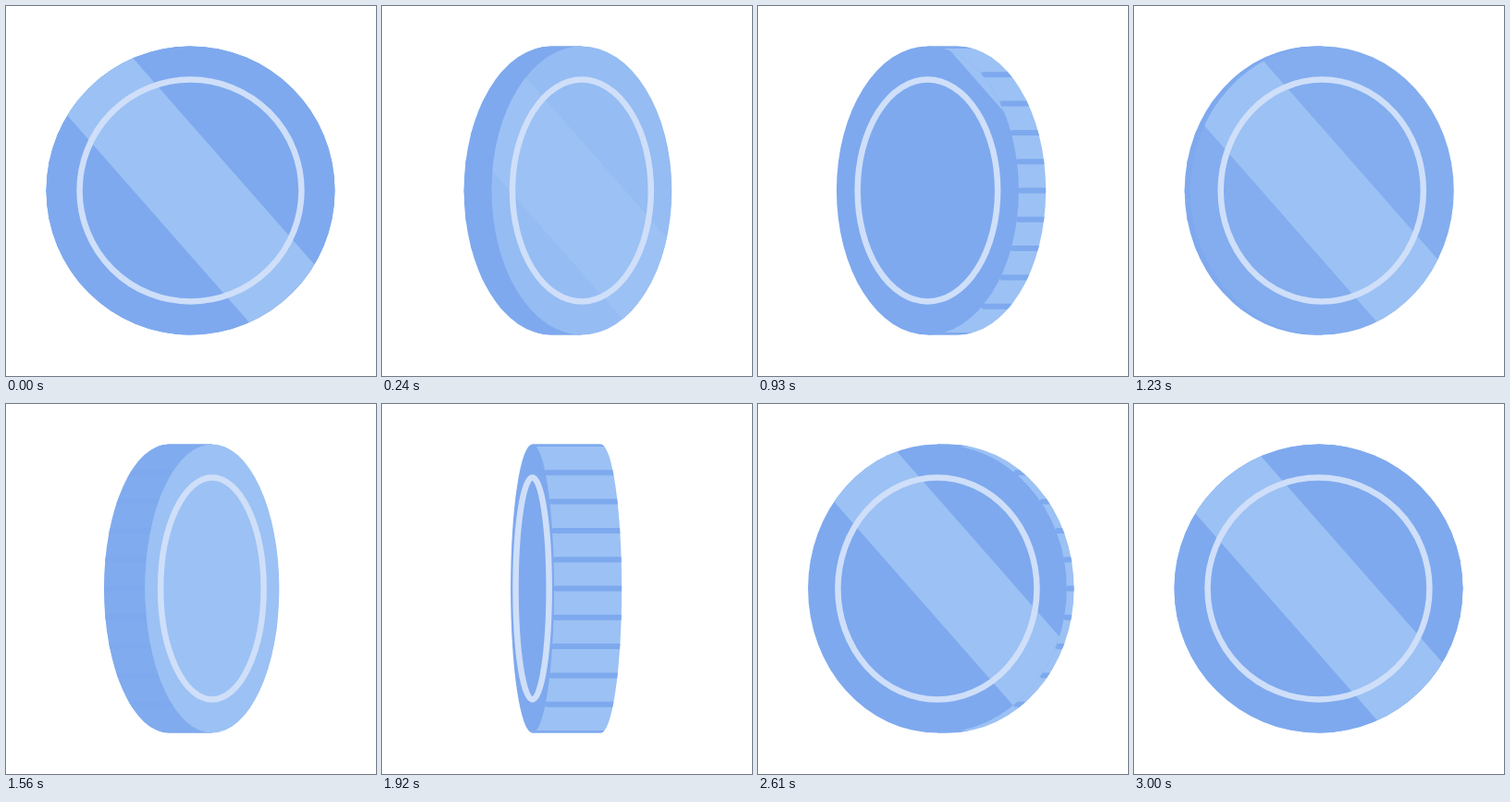
Recreate the animation shown at these times as an HTML page with a canvas. Size 400 px wide and 400 px high, loop 3030 ms.

```html
<!DOCTYPE html>
<html>
<head>
<meta charset="utf-8">
<title>Spinning coin</title>
<style>
html, body { margin: 0; width: 100%; height: 100%; overflow: hidden; background: #fff; }
canvas { display: block; }
</style>
</head>
<body>
<canvas id="stage" width="400" height="400"></canvas>
<script>
const ctx = document.getElementById('stage').getContext('2d');
const MID = 199.5, R = 156, SLOPE = 1.138, LOOP = 3030, STEP = 30;
const DARK = [126, 169, 238], LIGHT = [156, 193, 244], RING = '#cfdff9';

// Signed half width of the face: positive faces right, negative faces left.
const TURNS = [
  [[0, 156], [480, 36], [930, -98.5], [1080, -137], [1165, -156]],
  [[1165, 156], [1560, 72.5], [1920, -23.5], [2160, -80], [2280, -102], [2700, -147.5], [3000, -156]]
];

const clamp = (v, a, b) => Math.min(b, Math.max(a, v));
const mix = m => `rgb(${DARK.map((v, i) => Math.round(v + (LIGHT[i] - v) * m))})`;

// Smooth curve through the points.
function curve(pts, t) {
  const last = pts.length - 1;
  if (t >= pts[last][0]) return pts[last][1];
  const slope = i => {
    const a = pts[Math.max(0, i - 1)], b = pts[Math.min(last, i + 1)];
    return (b[1] - a[1]) / (b[0] - a[0]);
  };
  const i = pts.findIndex(p => p[0] > t) - 1;
  const [t0, v0] = pts[i], [t1, v1] = pts[i + 1];
  const h = t1 - t0, u = (t - t0) / h, u2 = u * u, u3 = u2 * u;
  return (2 * u3 - 3 * u2 + 1) * v0 + (u3 - 2 * u2 + u) * h * slope(i) +
         (3 * u2 - 2 * u3) * v1 + (u3 - u2) * h * slope(i + 1);
}

function disc(x, rx, ry) {
  const p = new Path2D();
  p.ellipse(x, MID, rx, ry, 0, 0, Math.PI * 2);
  return p;
}

// Diagonal band given by its two crossings of the middle line.
function sheen(low, high) {
  const dx = 200 / SLOPE;
  ctx.beginPath();
  ctx.moveTo(low - dx, MID - 200);
  ctx.lineTo(high - dx, MID - 200);
  ctx.lineTo(high + dx, MID + 200);
  ctx.lineTo(low + dx, MID + 200);
  ctx.fill();
}

function draw(t) {
  const second = t >= 1165;
  const s = clamp(curve(TURNS[+second], t), -R, R);
  const r = Math.abs(s), q = r / R, rest = R - r, dir = s > 0 ? 1 : -1;
  const late = second && s < 0;
  const shift = (late ? 0.265 + 0.09 * q : 0.28) * rest;
  const front = MID + dir * shift, back = MID - dir * shift;
  const backR = r - (late ? 40 : 20) * q * q * (1 - q);

  ctx.fillStyle = '#fff';
  ctx.fillRect(0, 0, 400, 400);

  // Rim with its notches
  const rim = disc(back, backR, R);
  rim.rect(Math.min(front, back), MID - R, 2 * shift, 2 * R);
  ctx.fillStyle = mix(s < 0 ? 1 : clamp((78 - s) / 78, 0, 1));
  ctx.fill(rim);
  ctx.save();
  ctx.clip(rim);
  ctx.strokeStyle = mix(0);
  ctx.lineWidth = 6;
  ctx.lineCap = 'round';
  for (let i = -5; i <= 5; i++) {
    const y = i * 31.3;
    const x = front - dir * (r * Math.sqrt(Math.max(0, 1 - (y / R) ** 2)) + 2);
    ctx.beginPath();
    ctx.moveTo(x, MID + y);
    ctx.lineTo(x - dir * 400, MID + y);
    ctx.stroke();
  }
  ctx.restore();

  // Face
  const face = disc(front, r, R);
  ctx.fillStyle = mix(s < 0 ? 0 : clamp(rest / 75, 0, 1));
  ctx.fill(face);
  ctx.save();
  ctx.clip(face);
  ctx.fillStyle = mix(1);
  if (s > 0) sheen(137.7, 263);
  else if (late) sheen(137.7 + 1.68 * rest, 263 + 1.07 * rest);
  else sheen(137.7 + 3.53 * rest, 263 + 3.3 * rest);
  ctx.restore();

  ctx.strokeStyle = RING;
  ctx.lineWidth = 6.5;
  ctx.stroke(disc(front, r * 0.769, 120));
}

const start = performance.now();
function tick() {
  const t = (performance.now() - start) % LOOP;
  draw(Math.floor(t / STEP) * STEP);
  requestAnimationFrame(tick);
}
tick();
</script>
</body>
</html>
```
